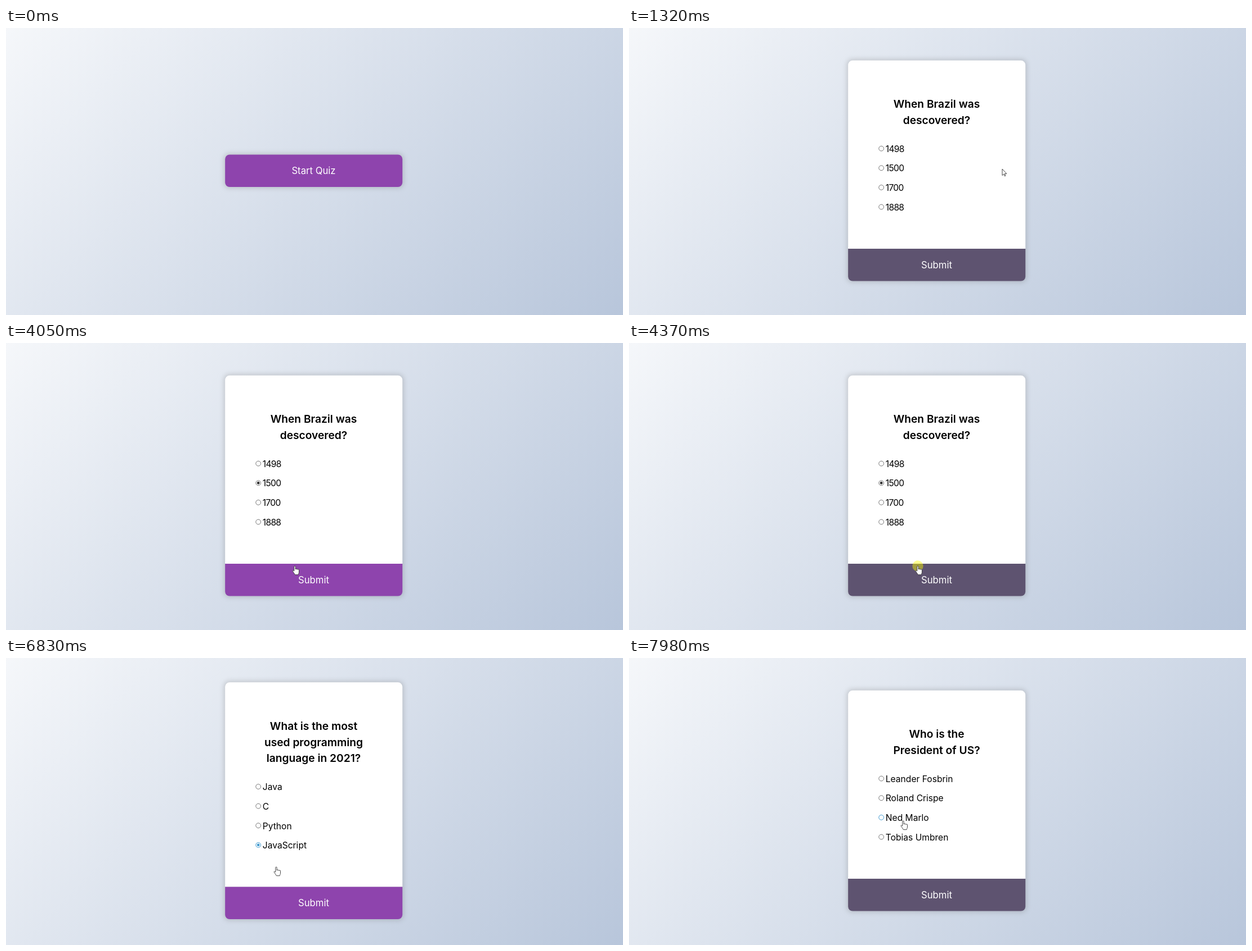
An HTML page that plays this animation: 1096 px wide and 511 px high, repeating every 8000 ms.

```html
<!DOCTYPE html>
<html lang="en">
<head>
<meta charset="utf-8">
<title>Quiz</title>
<style>
  html, body { margin: 0; width: 100%; height: 100%; overflow: hidden; }
  body { background: linear-gradient(135deg, #f5f7fa, #b8c6db); }
  svg { display: block; width: 1096px; height: 511px; font-family: Inter, sans-serif; }
  .title { font-size: 19.2px; font-weight: 600; text-anchor: middle; }
  .option { font-size: 15.6px; }
  .button { font-size: 16.7px; text-anchor: middle; fill: #fff; }
  .shadow { fill: rgba(100, 100, 100, .27); filter: blur(4.5px); }
  .pointer { fill: #fff; stroke: #333; stroke-width: .9; stroke-linejoin: round; }
</style>
</head>
<body>
<svg id="stage" viewBox="0 0 1096 511"></svg>
<script>
const LOOP = 8000, TICK = 1000 / 15, ENTER = 310;
const LEFT = 389.2, WIDTH = 315, CENTER = 546.5, BUTTON_H = 57.5;
const BUTTON_COLORS = { idle: '#8e44ad', hover: '#732d91', focus: '#5e5370' };

const slides = [
  { top: 225.5 },
  { top: 57.8, title: ['When Brazil was', 'descovered?'],
    options: ['1498', '1500', '1700', '1888'], tracking: -.7 },
  { top: 43.3, title: ['What is the most', 'used programming', 'language in 2021?'],
    options: ['Java', 'C', 'Python', 'JavaScript'] },
  { top: 57.8, title: ['Who is the', 'President of US?'],
    options: ['Leander Fosbrin', 'Roland Crispe', 'Ned Marlo', 'Tobias Umbren'] },
];

// Each entry changes part of the state from its time on.
const events = [
  [0, { slide: 0, button: 'idle', pointer: '', over: -1, checked: -1, press: false }],
  [310, { pointer: 'arrow' }],
  [700, { pointer: 'hand' }],
  [770, { button: 'hover' }],
  [1130, { press: true, button: 'focus' }],
  [1320, { press: false, slide: 1, pointer: 'arrow' }],
  [2330, { pointer: 'hand', over: 2 }],
  [2660, { over: 1 }],
  [3140, { press: true, button: 'idle' }],
  [3340, { press: false, checked: 1 }],
  [3700, { over: -1, pointer: 'arrow' }],
  [4030, { pointer: 'hand' }],
  [4100, { button: 'hover' }],
  [4370, { press: true, button: 'focus' }],
  [4560, { press: false, slide: 2, checked: -1, pointer: 'arrow' }],
  [5220, { pointer: 'hand', over: 2 }],
  [5430, { pointer: 'arrow', over: -1 }],
  [5760, { press: true, button: 'idle' }],
  [5960, { press: false }],
  [6160, { pointer: 'hand', over: 3 }],
  [6500, { press: true }],
  [6700, { press: false, checked: 3 }],
  [6900, { over: -1 }],
  [7040, { button: 'hover' }],
  [7300, { press: true, button: 'focus' }],
  [7500, { press: false, slide: 3, checked: -1 }],
  [7840, { pointer: 'arrow' }],
  [7910, { pointer: 'hand', over: 3 }],
  [7980, { over: 2 }],
];

// Pointer stops: time, x, y
const stops = [
  [250, 992, 459], [860, 663, 251], [1660, 663, 251], [2460, 481, 285],
  [2520, 481, 285], [2580, 481, 276], [2870, 479, 254], [3380, 479, 254],
  [4040, 513, 397], [4840, 513, 397], [5250, 473, 300], [5430, 470, 321],
  [6090, 470, 321], [6230, 470, 328], [6700, 470, 328], [6840, 480, 372],
  [6970, 487, 430], [7705, 487, 430], [7970, 487, 290],
];

const pointers = {
  arrow: 'M0 0V11.5L2.7 9L4.4 12.8L5.9 12.1L4.3 8.4H7.8Z',
  hand: 'M-1.2 9V1.2a1.2 1.2 0 0 1 2.4 0V6a1.1 1.1 0 0 1 2.2.2a1.1 1.1 0 0 1 2.1.4' +
        'a1 1 0 0 1 2 .6V11c0 2-1 2.5-1.3 4.6H.4C-.5 13.2-2.5 11.6-3.7 9.4c-.7-1.4.8-2 1.6-1z',
};

const smooth = p => p * p * (3 - 2 * p);

function pointerAt(time) {
  const t = ENTER + Math.floor((time - ENTER) / TICK + .3) * TICK;
  const next = stops.findIndex(stop => stop[0] > t);
  if (next < 0) return stops.at(-1).slice(1);
  if (next === 0) return stops[0].slice(1);
  const [t0, x0, y0] = stops[next - 1], [t1, x1, y1] = stops[next];
  const p = smooth((t - t0) / (t1 - t0));
  return [x0 + (x1 - x0) * p, y0 + (y1 - y0) * p];
}

const text = (cls, x, y, content, extra = '') =>
  `<text class="${cls}" x="${x}" y="${y}" ${extra}>${content}</text>`;

// Panel with separate radii for its top and bottom corners
const panel = (y, height, top, bottom, fill) =>
  `<path fill="${fill}" d="M${LEFT} ${y + top}a${top} ${top} 0 0 1 ${top} ${-top}` +
  `h${WIDTH - 2 * top}a${top} ${top} 0 0 1 ${top} ${top}v${height - top - bottom}` +
  `a${bottom} ${bottom} 0 0 1 ${-bottom} ${bottom}h${2 * bottom - WIDTH}` +
  `a${bottom} ${bottom} 0 0 1 ${-bottom} ${-bottom}z"/>`;

function option(label, i, top, tracking, { over, checked }) {
  const y = top + i * 34.65, hot = over === i;
  const dot = checked === i
    ? `<circle cx="448.2" cy="${y}" r="2.4" fill="${hot ? '#429bd0' : '#333'}"/>` : '';
  return `<circle cx="448.2" cy="${y}" r="4.4" fill="#fff" stroke="${hot ? '#429bd0' : '#767676'}"/>` +
    dot + text('option', 455.8, y + 6.2, label, `letter-spacing="${tracking}"`);
}

function card(state) {
  const { top, title, options, tracking = 0 } = slides[state.slide];
  const bodyH = title ? 277.5 + title.length * 28.9 : 0;
  const buttonY = top + bodyH;
  let out = `<rect class="shadow" x="${LEFT - 2}" y="${top - 2}" width="${WIDTH + 4}" ` +
    `height="${bodyH + BUTTON_H + 4}" rx="9"/>`;
  if (title) {
    out += panel(top, bodyH, 8, 0, '#fff');
    title.forEach((line, i) => out += text('title', CENTER, top + 84.3 + i * 28.9, line));
    const optionsTop = top + 99 + title.length * 28.9;
    options.forEach((label, i) => out += option(label, i, optionsTop, tracking, state));
  }
  return out + panel(buttonY, BUTTON_H, title ? 0 : 8, 8, BUTTON_COLORS[state.button]) +
    text('button', CENTER, buttonY + 34.5, title ? 'Submit' : 'Start Quiz');
}

function pointer({ pointer, press }, time) {
  if (!pointer) return '';
  const [x, y] = pointerAt(time);
  return `<g transform="translate(${x} ${y})">` +
    (press ? '<circle r="9.7" fill="#ff0" fill-opacity=".43"/>' : '') +
    `<path class="pointer" d="${pointers[pointer]}"/></g>`;
}

const stage = document.getElementById('stage');
const start = performance.now();

function draw() {
  const time = (performance.now() - start) % LOOP;
  const state = Object.assign({}, ...events.filter(e => e[0] <= time).map(e => e[1]));
  stage.innerHTML = card(state) + pointer(state, time);
  requestAnimationFrame(draw);
}
draw();
</script>
</body>
</html>
```
